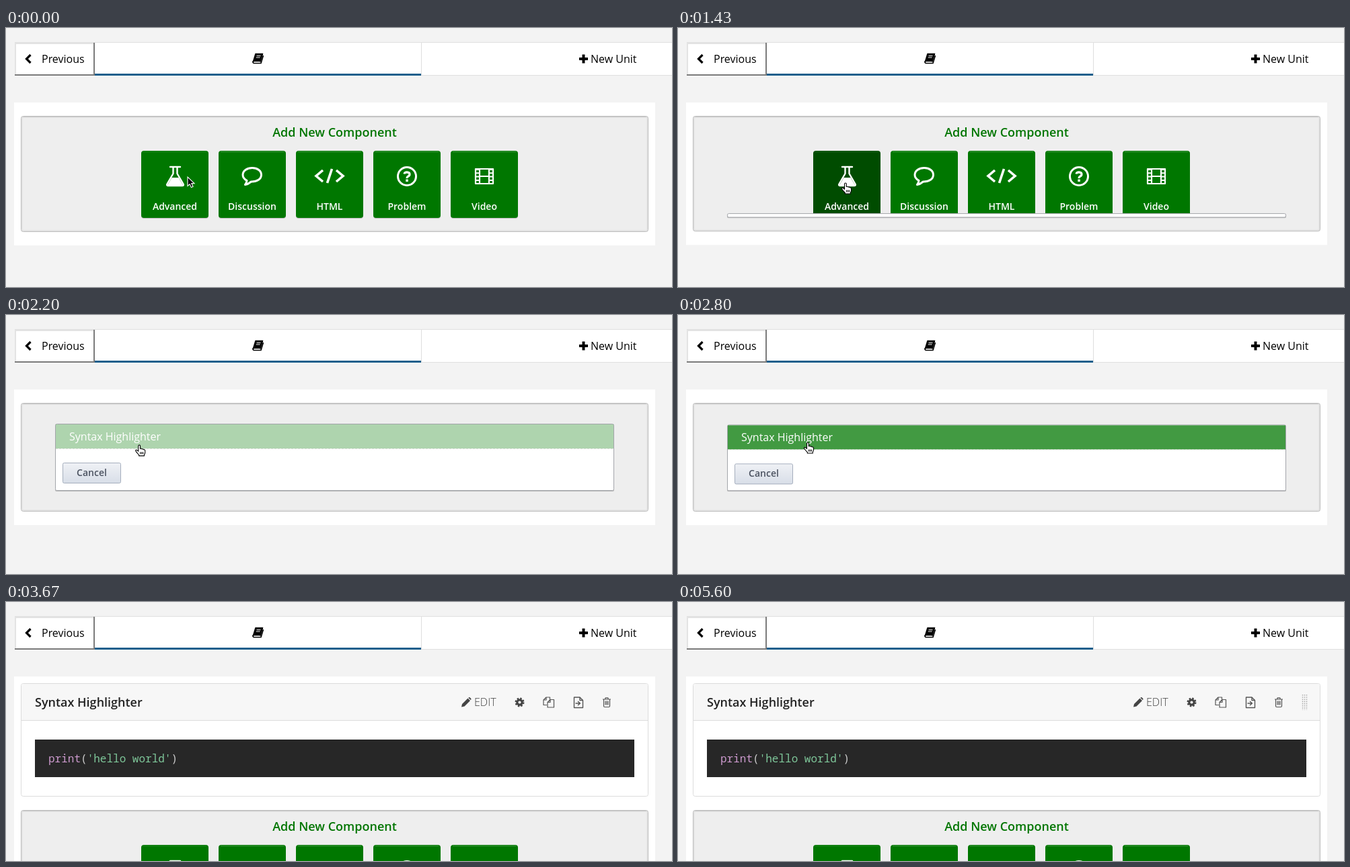
An HTML page for the animation above (5630 ms loop, 990 by 386 pixels).

```html
<!DOCTYPE html>
<html lang="en">
<head>
<meta charset="utf-8">
<style>
html, body { margin: 0; width: 100%; height: 100%; overflow: hidden; background: #f3f3f3; }
svg { display: block; width: 990px; height: 386px; }
text { font-family: "Open Sans", "Noto Sans", sans-serif; font-size: 16px; }
.semi { font-weight: 600; }
.mid { text-anchor: middle; }
.line { fill: none; stroke: #fff; stroke-width: 3; stroke-linecap: round; stroke-linejoin: round; }
.code { font-family: "Noto Sans Mono", "DejaVu Sans Mono", monospace; fill: #ccc; }
</style>
</head>
<body>
<svg viewBox="0 0 990 386">
  <defs>
    <linearGradient id="cancelFill" x2="0" y2="1">
      <stop stop-color="#eff1f5"/><stop offset="1" stop-color="#d8dee8"/>
    </linearGradient>
    <clipPath id="buttonsClip"><rect id="buttonsMask" x="20" y="144" width="940" height="142"/></clipPath>
    <clipPath id="menuClip"><rect id="menuMask" x="72" y="-1" width="834" height="102"/></clipPath>
  </defs>
  <rect width="990" height="386" fill="#f3f3f3"/>

  <!-- Unit navigation -->
  <rect x="13" y="21" width="980" height="50" fill="#e0e0e0"/>
  <rect x="13" y="22" width="980" height="48" fill="#fff"/>
  <path d="M617.5 22V70" stroke="#dedede"/>
  <path d="M132 69.5H617" stroke="#1b5f8c" stroke-width="3"/>
  <path d="M14 71V23H132" fill="none" stroke="#e3e3e3" stroke-width="2"/>
  <path d="M13 70H131V22" fill="none" stroke="#7b7b7b" stroke-width="2"/>
  <path d="M36.5 40L30.5 46L36.5 52" fill="none" stroke="#000" stroke-width="3.2"/>
  <text x="53" y="52">Previous</text>
  <g stroke-linejoin="round">
    <path d="M371 38.5H381.5L378 50H367.5Z" stroke="#000" stroke-width="1.6"/>
    <path d="M382.5 41L379 52.5H368.5Q366.5 52 367 49.5" fill="none" stroke="#000" stroke-width="1.6"/>
    <path d="M372.5 41.5H378.5M371.7 44H377.7M368.5 50.7H377.5" stroke="#fff"/>
  </g>
  <path d="M852 46H865M858.5 39.5V52.5" stroke="#000" stroke-width="4"/>
  <text x="869" y="52">New Unit</text>

  <rect id="page" x="12" y="111" width="953" fill="#fff"/>

  <!-- Added component -->
  <g id="component">
    <rect x="22.5" y="121.5" width="932" height="168" rx="3" fill="#fff" stroke="#dcdcdc"/>
    <path d="M23 176.5V124Q23 122 25 122H952Q954 122 954 124V176.5Z" fill="#f7f7f7"/>
    <path d="M23 176.5H954" stroke="#dcdcdc"/>
    <text class="semi" x="43" y="156" font-size="18" style="font-size:18px" fill="#222">Syntax Highlighter</text>
    <path d="M677 156.5L678 152L686.5 143.5L690 147L681.5 155.5ZM687.3 142.7L688.3 142Q689 141.7 689.6 142.3L691.3 144Q691.8 144.7 691.2 145.4L690.6 146Z" fill="#444"/>
    <text x="696" y="155" fill="#444" font-weight="300">EDIT</text>
    <circle cx="763.5" cy="149.5" r="3.7" fill="none" stroke="#444" stroke-width="3.2"/>
    <circle cx="763.5" cy="149.5" r="5.9" fill="none" stroke="#444" stroke-width="2.2" stroke-dasharray="2.5 2.134"/>
    <g fill="none" stroke="#555" stroke-width="1.2" stroke-linejoin="round">
      <path d="M804 153.5H799V146L803 142H808.5V146M803 142V146H799M805 149.5L809 145.5H814.5V157H805ZM809 145.5V149.5H805"/>
      <path d="M844.5 142H853L857.5 146.5V157.5H844.5ZM853 142V146.5H857.5M846.5 151H852.5M850 148L853.5 151L850 154" stroke-width="1.4"/>
      <path d="M888.5 145H897.5V155Q897.5 156.5 896 156.5H890Q888.5 156.5 888.5 155ZM887 145H899M890.5 145L891.2 142.8H894.8L895.5 145M891 147.5V153.5M893 147.5V153.5M895 147.5V153.5"/>
    </g>
    <path id="handle" d="M928.5 138V161M931.5 138V161M934.5 138V161" stroke="#aaa" stroke-width="1.4" stroke-dasharray="1.6 1.6"/>
    <rect x="43" y="205" width="891" height="56" fill="#272727"/>
    <text class="code" x="63" y="239"><tspan fill="#cc99cd">print</tspan>(<tspan fill="#7ec699">'hello world'</tspan>)</text>
  </g>

  <!-- Component picker -->
  <g id="picker">
    <rect id="panel" x="22.5" y="131.5" width="932" rx="3" fill="#eee" stroke="#bcbcbc"/>
    <rect id="inset" x="24" y="133" width="929" rx="2" fill="none" stroke="#000" stroke-opacity=".045" stroke-width="2"/>
    <path d="M25 132.5H952" stroke="#000" stroke-opacity=".1"/>
    <g clip-path="url(#buttonsClip)">
      <text class="semi mid" x="488.5" y="162" style="font-size:18px" fill="#007500">Add New Component</text>
      <g id="buttons"></g>
      <path d="M244 207H259M248.5 207.5V217L239.5 232.5Q238.5 235 241 235H262Q264.500 235 263.500 232.500L254.500 217V207.500" class="line" style="stroke-width:2.4"/>
      <path d="M246.500 223H256.500L263 234H240Z" fill="#fff"/>
      <path class="line" d="M366 208.500C374 208.500 379.500 213 379.500 218.800C379.500 225 373.500 229.300 364.500 229C361.500 231.500 359 233 355.500 233.500C357.200 231.500 357.800 229.500 358 227.300C354 225.300 352 222.300 352 218.800C352 213 358 208.500 366 208.500Z"/>
      <path class="line" d="M471 212L461 220.500L471 229M491 212L501 220.500L491 229M484.500 210L477.500 231" style="stroke-width:3.6;stroke-linecap:butt;stroke-linejoin:miter"/>
      <circle class="line" cx="596" cy="221" r="13.500"/>
      <path class="line" d="M592 217.500Q592.500 214.800 596 214.800Q600 215 600 218Q600 220 597.700 221.200Q596 222.200 596 224" style="stroke-width:3.200;stroke-linecap:butt"/>
      <rect x="594.300" y="225.500" width="3.500" height="3.500" fill="#fff"/>
      <path class="line" d="M698 210H724V232H698ZM704 210V232M718 210V232M704 221H718" style="stroke-width:2.200"/>
      <path d="M701 210V232M721 210V232" stroke="#fff" stroke-width="5" stroke-dasharray="2 3.300"/>
    </g>
    <g id="menu" clip-path="url(#menuClip)">
      <rect id="menuShadow" x="73" y="1" width="831" rx="2" fill="#999" opacity=".6"/>
      <rect id="menuBox" x="73.5" y=".5" width="830" rx="2" fill="#fff" stroke="#a3a5aa"/>
      <rect id="row" x="74" y="1" width="829" height="36" fill="#007700"/>
      <path d="M74 37.500H903" stroke="#e3e3e3" stroke-dasharray="3 2"/>
      <text id="rowText" x="94" y="25">Syntax Highlighter</text>
      <rect x="84.500" y="58.500" width="86" height="30" rx="2" fill="url(#cancelFill)" stroke="#a5aebd"/>
      <text class="semi mid" x="127.500" y="78" style="font-size:14px" fill="#4c5361">Cancel</text>
    </g>
  </g>

  <path id="arrow" d="M0 0V13.500L3.200 10.600L5.400 15.600L8 14.500L5.800 9.600H10Z" fill="#000" stroke="#fff" stroke-width="1.100"/>
  <path id="hand" d="M-1 1.500Q-1 0 .4 0T1.800 1.500V5.500Q3.500 4.700 4.500 6Q6 5.500 6.800 6.800Q9 6.500 9 8.500V11Q8.800 13 7.800 14.200V16H-.2V14.500Q-2.500 12.500-4.800 9Q-5.500 7.500-4.200 7.200Q-2.800 7.200-1 9.300ZM2 10.500V13.500M4 10.500V13.500M6 10.500V13.500" fill="#fff" stroke="#000" stroke-width="1.100" stroke-linejoin="round"/>
</svg>
<script>
const LOOP = 5630;
const $ = id => document.getElementById(id);
const set = (id, attrs) => Object.entries(attrs).forEach(([k, v]) => $(id).setAttribute(k, v));
const show = (id, on) => set(id, { display: on ? "inline" : "none" });
const ramp = (t, start, length) => Math.min(1, Math.max(0, (t - start) / length));
const swing = (t, start, length) => .5 - Math.cos(Math.PI * ramp(t, start, length)) / 2;
const mix = (a, b, k) => a + (b - a) * k;

$("buttons").innerHTML = ["Advanced", "Discussion", "HTML", "Problem", "Video"].map((label, i) => {
  const x = 201 + 115 * i;
  return `<rect x="${x}" y="184" width="100" height="100" rx="4" fill="#000" opacity=".22"/>
    <rect ${i ? "" : 'id="advanced"'} x="${x}" y="183" width="100" height="100" rx="4" fill="#007700"/>
    <path d="M${x + 3} 184.500H${x + 97}" stroke="#fff" stroke-opacity="${i ? .25 : .12}"/>
    <text class="semi mid" x="${x + 50}" y="271" style="font-size:14px" fill="#fff">${label}</text>`;
}).join("");

function cursorAt(t) {
  const reach = swing(t, 600, 220), pick = swing(t, 1800, 500), leave = ramp(t, 3100, 520) ** 2;
  return [
    mix(mix(mix(270, 247.5, reach), 191.5, pick), 180, leave),
    mix(mix(mix(222, 231, reach), 190, pick), 420, leave)
  ];
}

function draw(t) {
  const open = swing(t, 1390, 250) - swing(t, 2784, 250);
  const added = t >= 3585;
  const shift = added ? 179 : 0;
  const panelHeight = mix(172, 161, open);

  set("page", { height: added ? 275 : panelHeight + 41 });
  set("panel", { height: panelHeight });
  set("inset", { height: panelHeight - 3 });
  set("picker", { transform: `translate(0 ${shift})` });
  set("buttonsMask", { height: 142 * (1 - open) });
  show("component", added);
  show("handle", t >= 3800);

  const pressed = t < 1700 ? ramp(t, 620, 150) : 0;
  set("advanced", { fill: `rgb(0 ${mix(119, 76, pressed)} 0)` });

  const menuTop = 144 + 140 * (1 - open) + 18 * open;
  const menuHeight = 100 * open;
  show("menu", open > .001);
  set("menu", { transform: `translate(0 ${menuTop})` });
  set("menuMask", { height: menuHeight + 2 });
  set("menuBox", { height: Math.max(0, menuHeight - 1) });
  set("menuShadow", { height: menuHeight });
  const hover = swing(t, 2133, 150) - swing(t, 2864, 150);
  set("row", { opacity: .74 * hover });
  set("rowText", { fill: t > 2150 && t < 2900 ? "#fff" : "#222" });

  const [x, y] = cursorAt(t);
  const pointing = (t >= 620 && t < 1495) || (t >= 2140 && t < 2864);
  show("arrow", !pointing && t < 3620);
  show("hand", pointing);
  set("arrow", { transform: `translate(${x} ${y})` });
  set("hand", { transform: `translate(${x + 1} ${y})` });
}

const begin = performance.now();
function tick() {
  draw((performance.now() - begin) % LOOP);
  requestAnimationFrame(tick);
}
draw(0);
requestAnimationFrame(tick);
</script>
</body>
</html>
```
